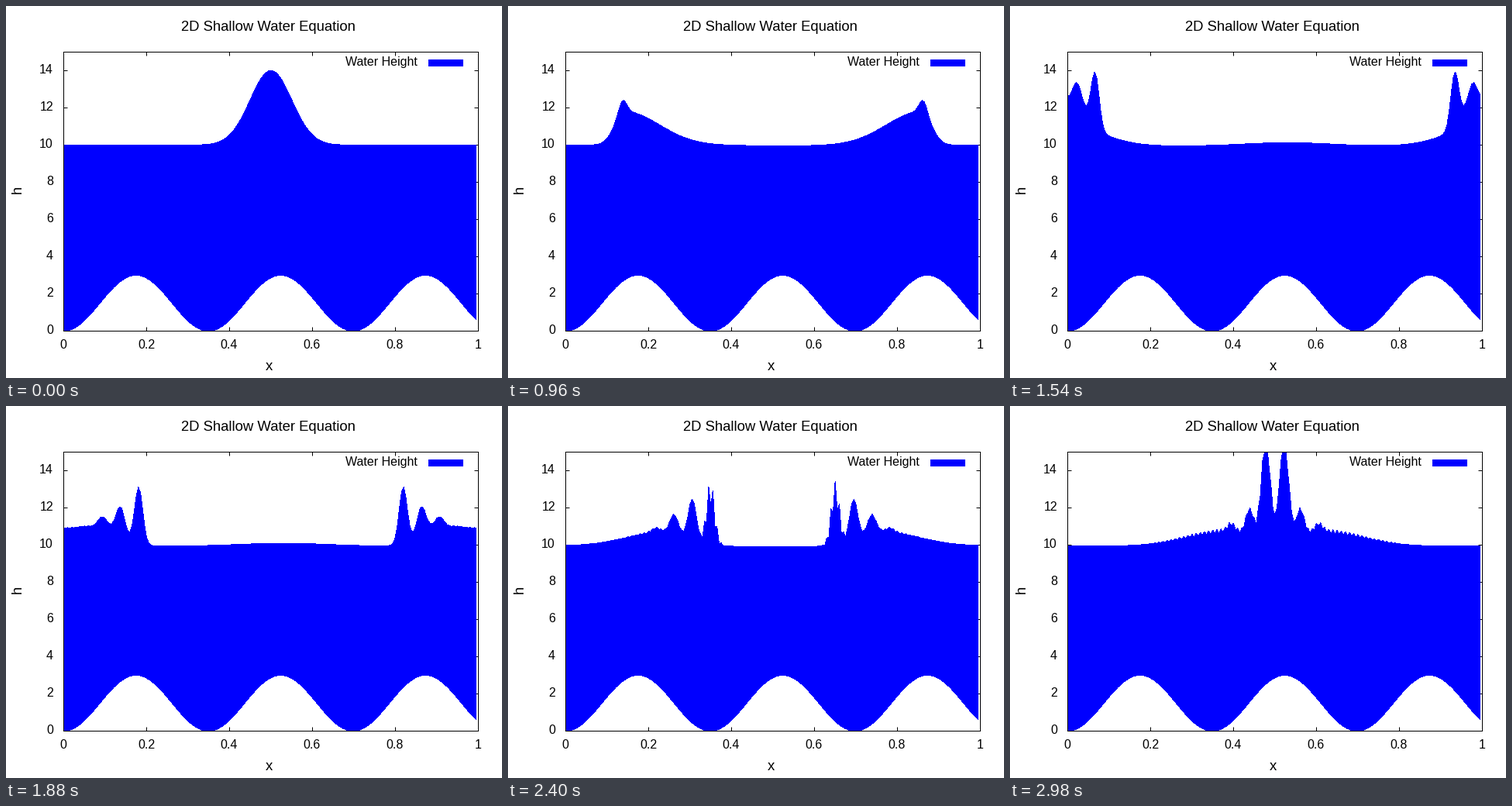
Recreate the animation shown at these times as a matplotlib script. Size 640 by 480 pixels, loop 3000 ms.

```python
import numpy as np
import matplotlib.pyplot as plt
from matplotlib.animation import FuncAnimation
from matplotlib.patches import Polygon, Rectangle

W, H, DPI = 640, 480, 100
FRAMES, STEP = 150, 20
BLUE = "#0000ff"
PX = 72 / DPI

plt.rcParams["font.family"] = "Liberation Sans"

N = 200
x = np.arange(N) / N
parity = (-1.0) ** np.arange(N)
bed = 3 * np.sin(9 * x) ** 2

SPACING, WIDTH = .044, .0095   # crest train
MAX_CREST = 3


def ramp(t, start, end):
    return np.clip((t - start) / (end - start), 0, 1)


def bell(d, width):
    return np.exp(-d ** 2 / (2 * width ** 2))


def swell(d, lead, t):
    """Broad wave that steepens in front, stretches behind and decays."""
    pos = lead - .0014 * max(t - 45, 0)
    height = 2 - .2 * ramp(t, 0, 25) - ramp(t, 48, 108)
    front = .017 + .00055 * abs(t - 60)
    rear = .05 + .045 * (1 - np.exp(-t / 35))
    return height * bell(d - pos, np.where(d > pos, front, rear))


def packet(d, t, sign):
    """One travelling packet at distance d from its starting point."""
    lead = .00785 * t - 6.42e-6 * t ** 2
    ripple = .15 * (t / FRAMES) ** 5
    h = swell(d, lead, t) * (1 + ripple * parity)

    # The steep front sheds a train of crests, each born later and slower.
    jitter = 2.1 * bell(t - 132, 8)
    births = ((40, .077), (55, .033), (65, .017), (90, .007))
    for k, (start, growth) in enumerate(births):
        height = np.clip(growth * (t - start), 0, MAX_CREST)
        if k == 0:
            height -= .4 * jitter
        h = h + height * bell(d - lead + SPACING * k, WIDTH)

    # Cell-to-cell jitter where the first crest breaks
    return h + sign * jitter * parity * bell(d - lead, .012)


def surface(t):
    middle = -.13 * np.sin(2 * np.pi * t / 108)
    ends = -.06 * ramp(t, 50, 75)
    h = 10 + ends + (middle - ends) * np.exp(-((x - .53) / .15) ** 2)
    # Each packet returns from its wall as a mirrored image.
    for u, sign in ((x, -1), (1 - x, 1)):
        h = h + packet(.5 - u, t, sign) + packet(.5 + u, t, sign)
    return h


fig = plt.figure(figsize=(W / DPI, H / DPI), dpi=DPI, facecolor="white")
# Edges sit just before pixel centres so that lines snap onto them.
ax = fig.add_axes([74.4 / W, 60.6 / H, 535 / W, 360 / H])
ax.set(xlim=(0, 1), ylim=(0, 15),
       xticks=np.arange(6) / 5, yticks=range(0, 15, 2))
ax.set_axisbelow(True)
ax.tick_params(direction="in", length=5 * PX, width=PX, top=True, right=True,
               labelbottom=False, labelleft=False)
for spine in ax.spines.values():
    spine.set_linewidth(PX)


def label(px, py, text, size=16, ha="center", **kw):
    kw.setdefault("va", "baseline")
    fig.text(px / W, 1 - py / H, text, fontsize=size * PX, ha=ha, **kw)


label(338.5, 32, "2D Shallow Water Equation", 18.5)
label(339.5, 470, "x", 18.5)
label(15, 237, "h", 18.5, rotation=90, va="center")
label(531, 77, "Water Height", ha="right")
for i in range(6):
    label(74 + 107 * i, 442, f"{i / 5:g}")
for v in range(0, 15, 2):
    label(61, 423 - 24 * v, str(v), ha="right")

fig.add_artist(Rectangle((545 / W, 1 - 78 / H), 45 / W, 9 / H, color=BLUE,
                         lw=0, antialiased=False,
                         transform=fig.transFigure))

water = Polygon(np.zeros((2, 2)), closed=True, facecolor=BLUE, lw=0,
                antialiased=False, zorder=2)
ax.add_patch(water)


def draw(frame):
    top = np.column_stack((x, surface(frame)))
    floor = np.column_stack((x, bed))[::-1]
    water.set_xy(np.vstack((top, floor)))
    return (water,)


anim = FuncAnimation(fig, draw, frames=FRAMES, interval=STEP, repeat=True,
                     repeat_delay=0, blit=False)
plt.show()
```
